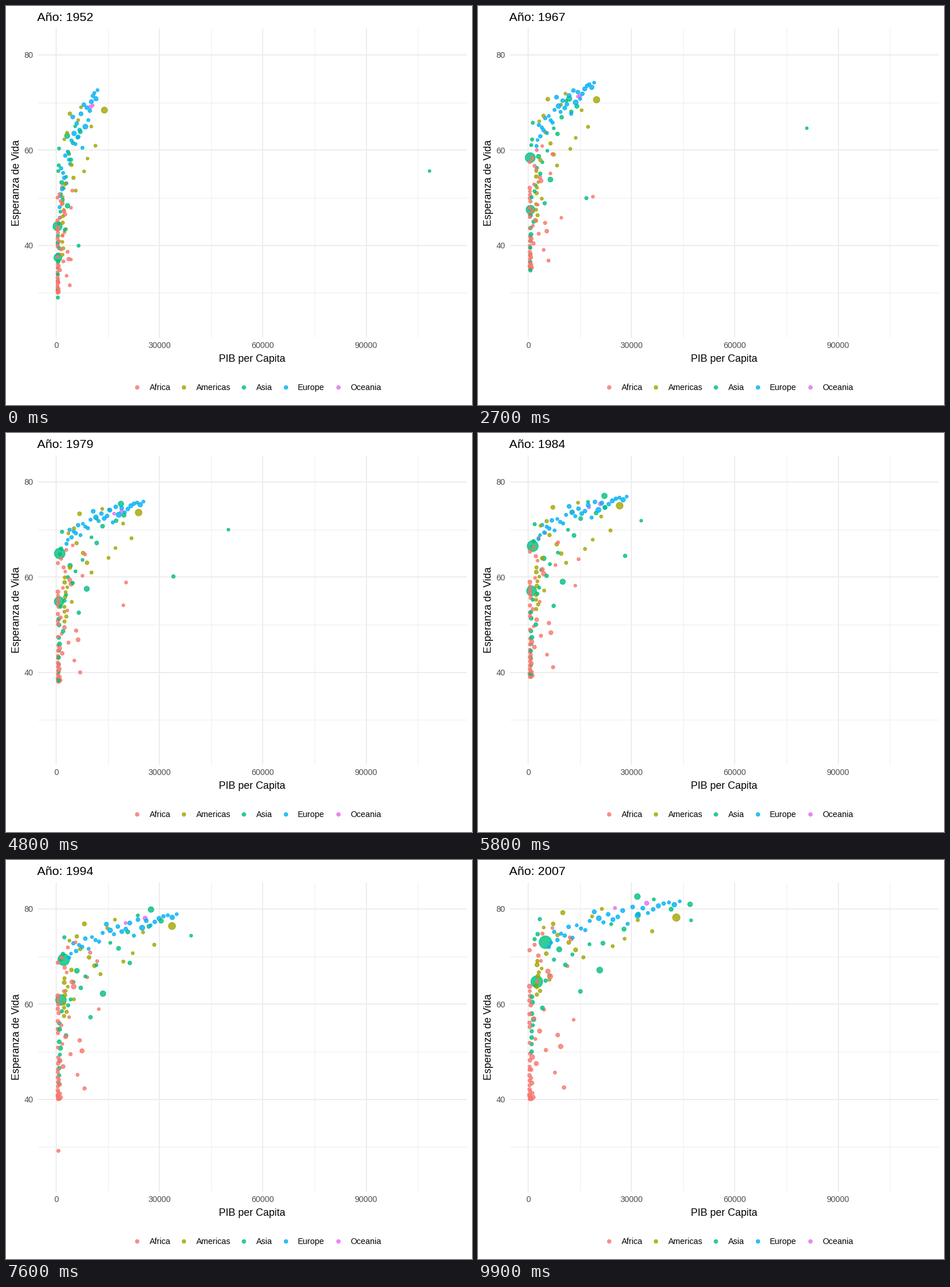
Animation, 808 px wide and 693 px high, one loop 10 s. Source, as a matplotlib script:

```python
import matplotlib.pyplot as plt
import numpy as np
from matplotlib.animation import FuncAnimation

W, H, DPI = 808, 693, 100
FRAMES = 100
PT = 72 / DPI                                # pixels to points
YEAR = 1952 + 5 * np.arange(FRAMES) / 9      # nine frames for every five years
KEYS = (1952, 1973, 1990, 2007)
rng = np.random.default_rng(11)

COLORS = {"Africa": "#F8766D", "Americas": "#A3A500", "Asia": "#00BF7D",
          "Europe": "#00B0F6", "Oceania": "#E76BF3"}

tracks = []


def add(group, pop, growth, gdp, life):
    people = pop * growth ** ((YEAR - 2007) / 55)
    tracks.append((COLORS[group], people, gdp, life))


def hero(group, pop, growth, *keys):
    """One dot led through (year, income in thousands, life)."""
    years, gdp, life = zip(*keys)
    add(group, pop, growth, np.interp(YEAR, years, gdp), np.interp(YEAR, years, life))


def spread(rank, bend, ranges):
    """Spread ranks from 0 to 1 over a (low, high) range that moves with time."""
    low, high = (np.interp(YEAR, KEYS, ends) for ends in zip(*ranges))
    return low + (high - low) * rank[:, None] ** bend


def crowd(group, n, pop, growth, mix, bends, gdp, life):
    """Many dots; mix loosens the tie between income and life."""
    rank = np.linspace(0, 1, n)
    loose = np.argsort(np.argsort(rank + rng.normal(0, mix, n))) / (n - 1)
    people = np.clip(rng.lognormal(np.log(pop), 1.1, n), .3, 200)
    for row in zip(people, spread(rank, bends[0], gdp), spread(loose, bends[1], life)):
        add(group, row[0], growth, *row[1:])


# The large or far-off dots
hero("Asia", 1319, 2.3, (1952, .4, 44), (1957, .6, 50.5), (1962, .5, 44.5),
     (1967, .6, 58.4), (1972, .7, 63.1), (1992, 1.7, 68.7), (2007, 5, 73))
hero("Asia", 1110, 2.9, (1952, .5, 37.4), (1977, .8, 54.2), (1992, 1.2, 60.2),
     (2007, 2.5, 64.7))
hero("Americas", 301, 1.9, (1952, 14, 68.4), (1972, 21.8, 71.3), (1982, 25, 74.7),
     (1992, 32, 76.1), (2007, 43, 78.2))
hero("Asia", 127, 1.45, (1952, 3.2, 63), (1972, 14.8, 73.4), (1992, 26.8, 79.4),
     (2007, 31.7, 82.6))
hero("Asia", 2.5, 15, (1952, 108.4, 55.6), (1957, 113.5, 58), (1967, 80.9, 64.6),
     (1972, 109.3, 67.7), (1977, 59.3, 69.3), (1982, 31.4, 71.3), (2007, 47.3, 77.6))
hero("Asia", 27.6, 7, (1952, 6.5, 39.9), (1967, 16.9, 49.9), (1977, 34.2, 58.7),
     (1982, 33.7, 63), (1987, 21.2, 66.3), (2007, 21.7, 72.8))
hero("Africa", 6, 6, (1952, 2.4, 42.7), (1962, 6.8, 47.8), (1967, 18.8, 50.2),
     (1977, 22, 57.4), (1987, 11.8, 66.2), (2007, 12.1, 74))
hero("Africa", 1.5, 3.5, (1952, 4.3, 37), (1972, 11.4, 48.7), (1977, 21.7, 52.8),
     (1982, 15.1, 56.6), (1987, 11.9, 60.2), (2007, 13.2, 56.7))
hero("Africa", 8.9, 3.5, (1952, .5, 40), (1987, .8, 44), (1992, .7, 23.6),
     (1997, .6, 36.1), (2007, .9, 46.2))
lead = len(tracks)

crowd("Africa", 49, 9, 4, .6, (4.5, 1.6),
      gdp=[(.4, 4.7), (.5, 8), (.5, 9), (.4, 12.5)],
      life=[(30, 53), (37, 64), (40, 72), (40, 76)])
crowd("Americas", 24, 9, 2.6, .3, (3, 1),
      gdp=[(1.8, 11.4), (2.5, 19.8), (2.2, 26), (2.5, 36)],
      life=[(38, 69), (48, 73), (56, 77), (62, 80)])
crowd("Asia", 29, 20, 2.7, .2, (3.5, .9),
      gdp=[(.5, 7), (.7, 17), (.8, 25), (1, 47)],
      life=[(29, 65), (37, 72.5), (41, 77.5), (50, 82)])
crowd("Europe", 30, 10, 1.25, .12, (1.2, .7),
      gdp=[(1, 12), (3, 22), (3, 32), (6, 44)],
      life=[(48, 72.6), (66, 74.8), (69, 78), (72, 81.6)])
crowd("Oceania", 2, 10, 2.2, 0, (1, 1),
      gdp=[(10.6, 10), (16, 17), (18.5, 23), (25.2, 34.4)],
      life=[(69.4, 69.1), (72, 72.2), (76, 77), (80.2, 81.2)])

# Mix the groups so that none lies wholly on top
order = lead + rng.permutation(len(tracks) - lead)
tracks = tracks[:lead] + [tracks[i] for i in order]
colors = [t[0] for t in tracks]
POP, GDP, LIFE = (np.array([t[i] for t in tracks]) for i in (1, 2, 3))


def px(thousands):
    return 87 + thousands * 5.9725


def py(years):
    return 85 + (80 - years) * 8.263


def area(size):
    return ((size * 2.845 + .945) * 1.219 * PT) ** 2


X, Y = px(GDP), py(LIFE)
AREA = area(1 + 5 * np.sqrt(POP / 1319))

plt.rcParams["font.family"] = "Liberation Sans"
fig = plt.figure(figsize=(W / DPI, H / DPI), dpi=DPI, facecolor="white")
ax = fig.add_axes([0, 0, 1, 1])
ax.set(xlim=(0, W), ylim=(H, 0))
ax.axis("off")


def label(x, y, text, size, color="black", **kw):
    return ax.text(x, y, text, fontsize=size * PT, color=color, va="baseline", **kw)


def grid(xs, ys, width):
    style = dict(color="#EBEBEB", lw=width * PT, zorder=1)
    ax.vlines([px(x) for x in xs], 39, 576, **style)
    ax.hlines([py(y) for y in ys], 54.5, 799, **style)


grid((15, 45, 75, 105), (30, 50, 70), .87)
grid((0, 30, 60, 90), (40, 60, 80), 1.73)
for x in (0, 30, 60, 90):
    label(px(x), 594.5, str(x * 1000), 14.3, "#4D4D4D", ha="center")
for y in (40, 60, 80):
    label(47, py(y) + 5.5, str(y), 14.3, "#4D4D4D", ha="right")
label(426.5, 617.5, "PIB per Capita", 17.8, ha="center")
label(23, 307.5, "Esperanza de Vida", 17.8, ha="center",
      rotation=90, rotation_mode="anchor")
title = label(54.5, 26, "", 21.4)

dots = dict(alpha=.8, linewidths=1.15 * PT, zorder=3)
for x, tx, name in zip((227, 308, 411.5, 484.5, 575.5),
                       (249.3, 330, 434, 506.3, 597.3), COLORS):
    ax.scatter(x, 662, s=area(1.5), c=COLORS[name], **dots)
    label(tx, 667, name, 14.2)

points = ax.scatter(X[:, 0], Y[:, 0], s=AREA[:, 0], c=colors, **dots)


def draw(k):
    points.set_offsets(np.column_stack([X[:, k], Y[:, k]]))
    points.set_sizes(AREA[:, k])
    title.set_text(f"Año: {round(YEAR[k])}")
    return points, title


anim = FuncAnimation(fig, draw, frames=FRAMES, interval=100, repeat=True,
                     repeat_delay=0, blit=False)
plt.show()
```
